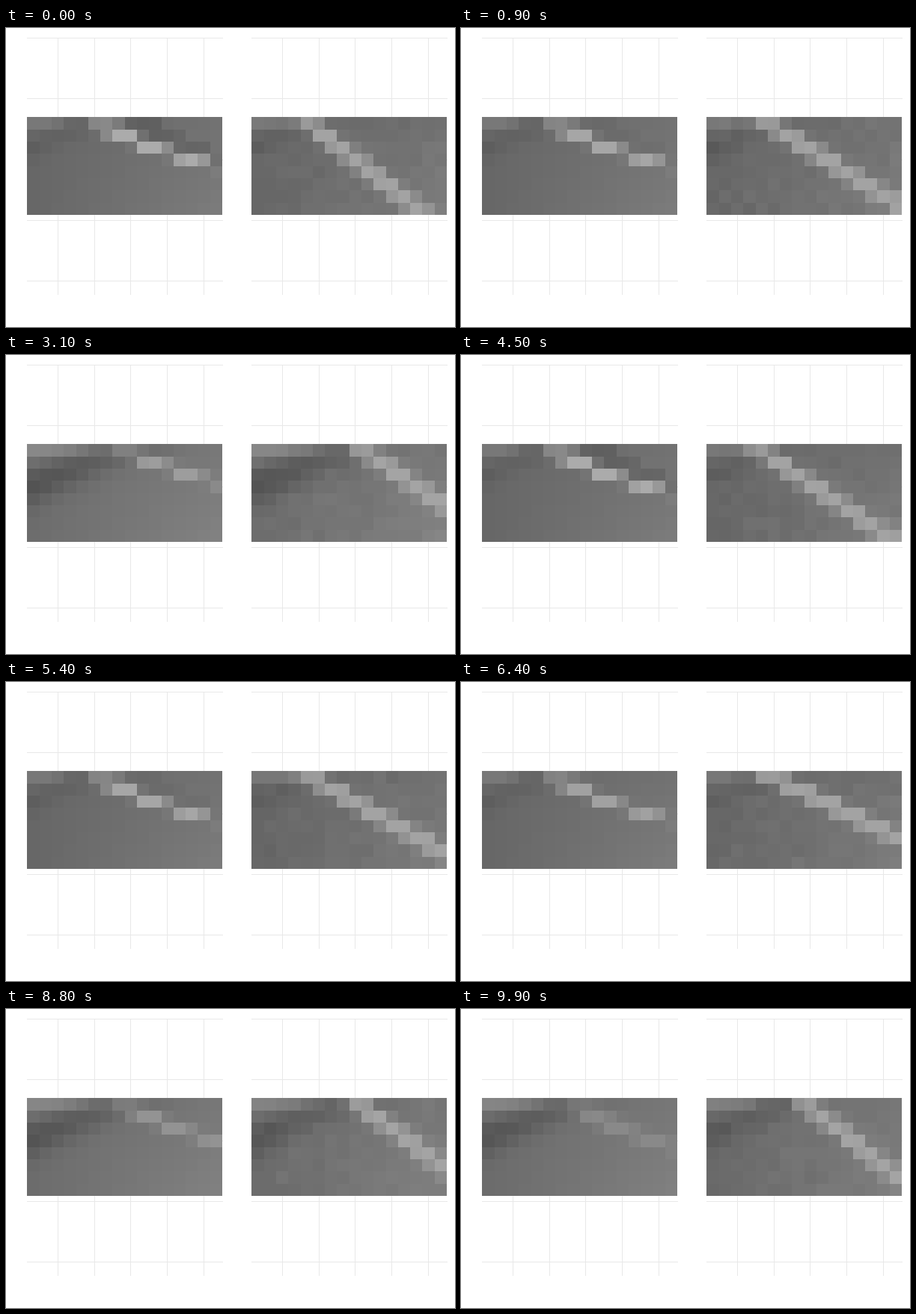
These frames come from a looping animation (600x400 px, 10 s). A matplotlib script:

```python
import numpy as np
import matplotlib.pyplot as plt
from matplotlib.animation import FuncAnimation

W, H, FRAMES, STEP = 600, 400, 100, 100
COLS, ROWS = 16, 8
C, R = np.meshgrid(np.arange(COLS), np.arange(ROWS))
rows = np.arange(ROWS)[:, None]

# Key poses: time step, ridge top, ridge slope, shade, ridge grey
STRONG, PLAIN = (5, 1.2, 0, 171), (5, 1.2, 0, 161)
SHADED, FAINT = (7, 1.7, 1, 157), (7, 0.7, 0.8, 137)
SOFT = [(0, *STRONG), (19, *PLAIN), (31, *SHADED), (45, *STRONG),
        (64, *PLAIN), (77, *SHADED), (99, *FAINT)]
SHARP = [(0, 3.7, 1.27, 0, 163), (19, 4.1, 1.95, 0.2, 162),
         (31, 8.1, 1.45, 1, 164), (45, 3.3, 1.48, 0, 163),
         (64, 4.0, 2.08, 0, 163), (77, 8.4, 1.42, 1, 164),
         (99, 7.2, 1.25, 0.5, 164)]


def pose_at(keys, frame):
    times, *tracks = np.array(keys, float).T
    return [np.interp(frame, times, track) for track in tracks]


def cover(start, end):
    """Share of each cell that lies between two edges given per row."""
    return np.clip(np.minimum(end, C + 1) - np.maximum(start, C), 0, 1)


def ground(shade):
    """Grey slope with a light top-left strip and a dark diagonal band."""
    base = 103 + 11 * C / 15 + 9 * C * R / 105 + 6 * shade
    strip = np.exp(-(C / (3 + 4 * shade)) ** 4 - 1.3 * R)
    across = (C + 2.2 * R - 4 - 2.3 * shade) / (1.6 + 0.9 * shade)
    band = np.exp(-across ** 2 / 2)
    return base + (18 + 10 * shade) * strip - (11 + 16 * shade) * band


def ridge(grey, start, end, peak, gain):
    """Lay the ridge over the ground with a pale halo; strong ones get a dark edge."""
    grey = grey + 6 * cover(start - 1, end + 1)
    grey -= 2 * max(peak - 164, 0) * cover(end + 0.7, end + 3.7)
    return grey + gain * cover(start, end) * (peak - grey)


def soft_view(frame):
    top, slope, shade, peak = pose_at(SOFT, frame)
    start = top + slope * rows + 0.4 * rows ** 2
    gain = np.where(R == 0, 0.45, R < 4)
    return ridge(ground(shade), start, start + 2.4, peak, gain)


def sharp_view(frame):
    top, slope, shade, peak = pose_at(SHARP, frame)
    start = top + slope * rows
    gain = np.where(R == 0, 0.85, 1)
    grain = np.random.default_rng(frame).normal(0, 2, C.shape)
    return ridge(ground(shade) + grain, start, start + slope + 0.75, peak, gain)


fig = plt.figure(figsize=(W / 100, H / 100), dpi=100, facecolor="white")
ax = fig.add_axes([0, 0, 1, 1])
ax.axis("off")


def panel(x):
    line = dict(color="#e8e8e8", lw=0.72, zorder=1)
    for i in range(5):
        gx, gy = x + 41 + 48.7 * i, 13 + 81.3 * i
        ax.plot([gx, gx], [13, 356], **line)
        ax.plot([x, x + 261], [gy, gy], **line)
    return ax.pcolormesh(np.linspace(x + 0.4, x + 261, COLS + 1),
                         np.linspace(119.3, 250, ROWS + 1),
                         np.zeros((ROWS, COLS)), cmap="gray",
                         vmin=0, vmax=255, zorder=2)


views = [(panel(28), soft_view), (panel(328), sharp_view)]
ax.set_xlim(0, W)
ax.set_ylim(H, 0)


def update(frame):
    for mesh, view in views:
        mesh.set_array(view(frame))
    return [mesh for mesh, _ in views]


anim = FuncAnimation(fig, update, frames=FRAMES, interval=STEP,
                     repeat=True, repeat_delay=0)
plt.show()
```
